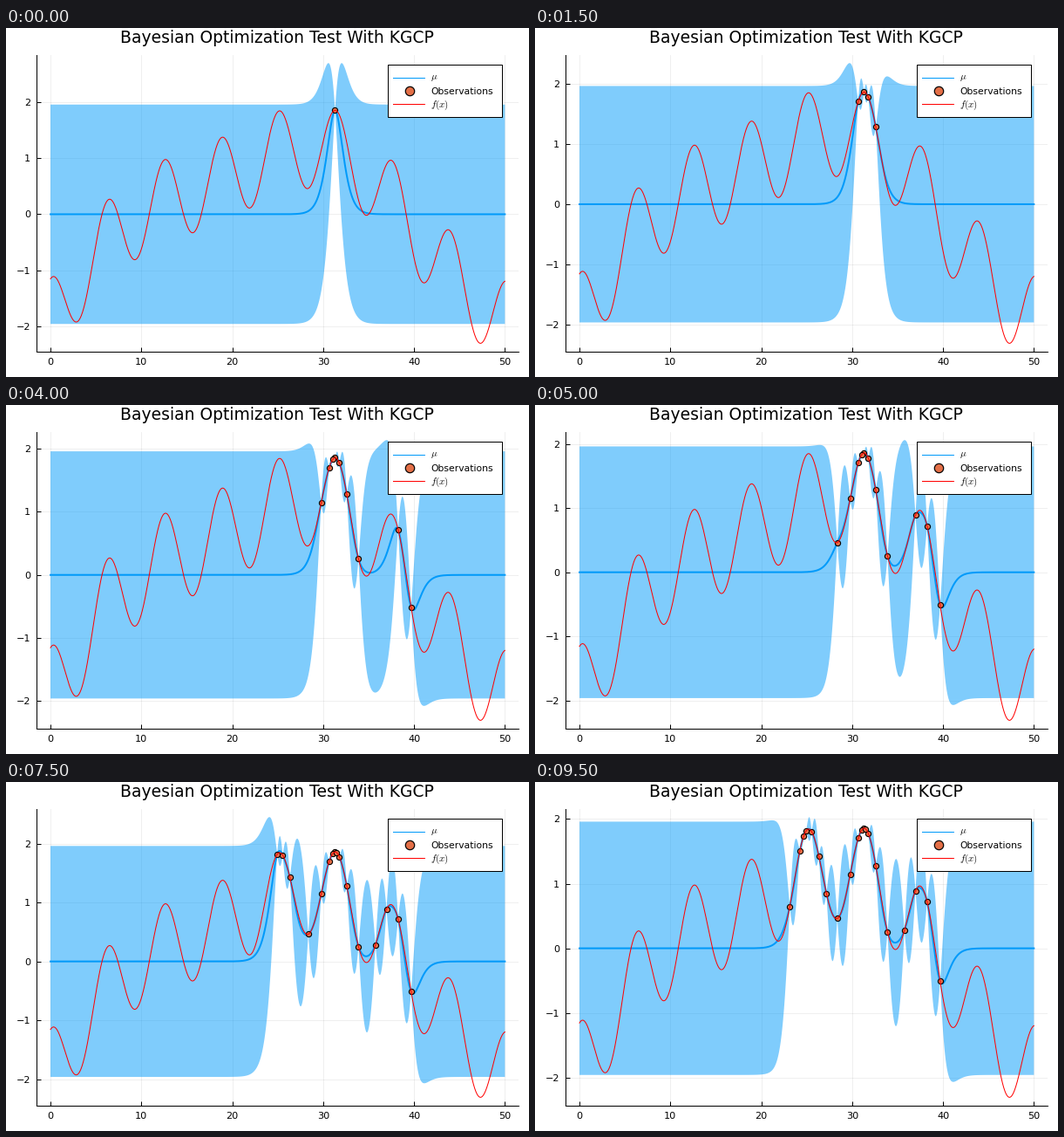
Write a matplotlib script that moves like this. It is 600 by 400 pixels and loops after 10 s.

```python
import numpy as np
import matplotlib.pyplot as plt
from matplotlib.animation import FuncAnimation
from matplotlib.patches import Rectangle

WIDTH, HEIGHT, DPI = 600, 400, 100
PX = 72 / DPI  # points per pixel
BLUE, ORANGE, RED = "#009afa", "#e36f47", "#ff0000"
LEFT, RIGHT, TOP, BOTTOM = 35.4, 588, 30.6, 371

plt.rcParams.update({
    "font.family": "DejaVu Sans",
    "mathtext.fontset": "cm",
    "axes.unicode_minus": True,
})

# Sampling locations in the order the optimizer visits them
SAMPLES = np.array([31.31, 31.78, 30.67, 32.6, 29.79, 31.05, 33.89, 38.25,
                    39.68, 36.97, 28.37, 35.76, 31.49, 26.34, 25.55, 24.95,
                    24.25, 23.14, 24.68, 27.17])


def objective(x):
    return (0.75 * np.cos(x) + 3 * np.sin(np.pi * x / 50)
            + 0.25 * np.sin(x / 4) - 1.905)


def matern52(a, b):
    r = np.sqrt(5) * np.abs(a[:, None] - b[None, :])
    return (1 + r + r**2 / 3) * np.exp(-r)


def posterior(x, xs):
    """Mean and standard deviation of a unit-variance, zero-mean GP."""
    cov = matern52(xs, xs) + 1e-6 * np.eye(len(xs))
    cross = matern52(x, xs)
    weights = np.linalg.solve(cov, cross.T)
    var = 1 - np.sum(cross.T * weights, axis=0)
    return weights.T @ objective(xs), np.sqrt(np.clip(var, 0, None))


fig = plt.figure(figsize=(WIDTH / DPI, HEIGHT / DPI), dpi=DPI, facecolor="white")
ax = fig.add_axes([LEFT / WIDTH, 1 - BOTTOM / HEIGHT,
                   (RIGHT - LEFT) / WIDTH, (BOTTOM - TOP) / HEIGHT])
ax.set_xlim(-1.5, 51.5)
ax.set_xticks(range(0, 51, 10))
ax.set_yticks(range(-2, 3))
ax.tick_params(direction="in", length=5 * PX, width=PX, labelsize=11.2 * PX)
ax.tick_params(axis="x", pad=7 * PX)
ax.tick_params(axis="y", pad=7.4 * PX)
ax.grid(color="black", alpha=0.08, linewidth=0.8 * PX)
ax.set_axisbelow(True)
for side in ("top", "right"):
    ax.spines[side].set_visible(False)
for side in ("left", "bottom"):
    ax.spines[side].set_linewidth(PX)
fig.text(311 / WIDTH, 1 - 17 / HEIGHT, "Bayesian Optimization Test With KGCP",
         fontsize=18.8 * PX, ha="center", va="baseline")

x = np.linspace(0, 50, 1501)
truth = objective(x)
ribbon, = ax.fill(x, truth, color=BLUE, alpha=0.5, linewidth=0, zorder=2)
mean_line, = ax.plot(x, truth, color=BLUE, linewidth=2 * PX, zorder=3)
dots, = ax.plot([], [], "o", color=ORANGE, markersize=6.2 * PX, snap=False,
                markeredgecolor="black", markeredgewidth=1.1 * PX, zorder=4)
ax.plot(x, truth, color=RED, linewidth=PX, zorder=5)


def draw_legend():
    key = fig.add_axes([0, 0, 1, 1], zorder=10)
    key.set(xlim=(0, WIDTH), ylim=(HEIGHT, 0))
    key.axis("off")
    key.add_patch(Rectangle((438, 42), 131, 60, facecolor="white",
                            edgecolor="black", linewidth=PX))
    key.plot([444, 480], [57, 57], color=BLUE, linewidth=PX)
    key.plot([444, 480], [87, 87], color=RED, linewidth=PX)
    key.plot(462.5, 72.3, "o", color=ORANGE, markersize=10.4 * PX, snap=False,
             markeredgecolor="black", markeredgewidth=1.2 * PX)
    for label, baseline, size in ((r"$\mu$", 59, 11), ("Observations", 76.5, 10.8),
                                  (r"$f(x)$", 91, 11)):
        key.text(487, baseline, label, fontsize=size * PX, va="baseline")


def update(step):
    xs = SAMPLES[:step + 1]
    mean, sd = posterior(x, xs)
    low, high = mean - 1.96 * sd, mean + 1.96 * sd
    ribbon.set_xy(np.column_stack([np.r_[x, x[::-1]], np.r_[high, low[::-1]]]))
    mean_line.set_ydata(mean)
    dots.set_data(xs, objective(xs))
    bottom, top = min(low.min(), truth.min()), max(high.max(), truth.max())
    margin = 0.03 * (top - bottom)
    ax.set_ylim(bottom - margin, top + margin)
    return ribbon, mean_line, dots


draw_legend()
anim = FuncAnimation(fig, update, frames=len(SAMPLES), interval=500,
                     repeat=True, repeat_delay=0, blit=False)
plt.show()
```
